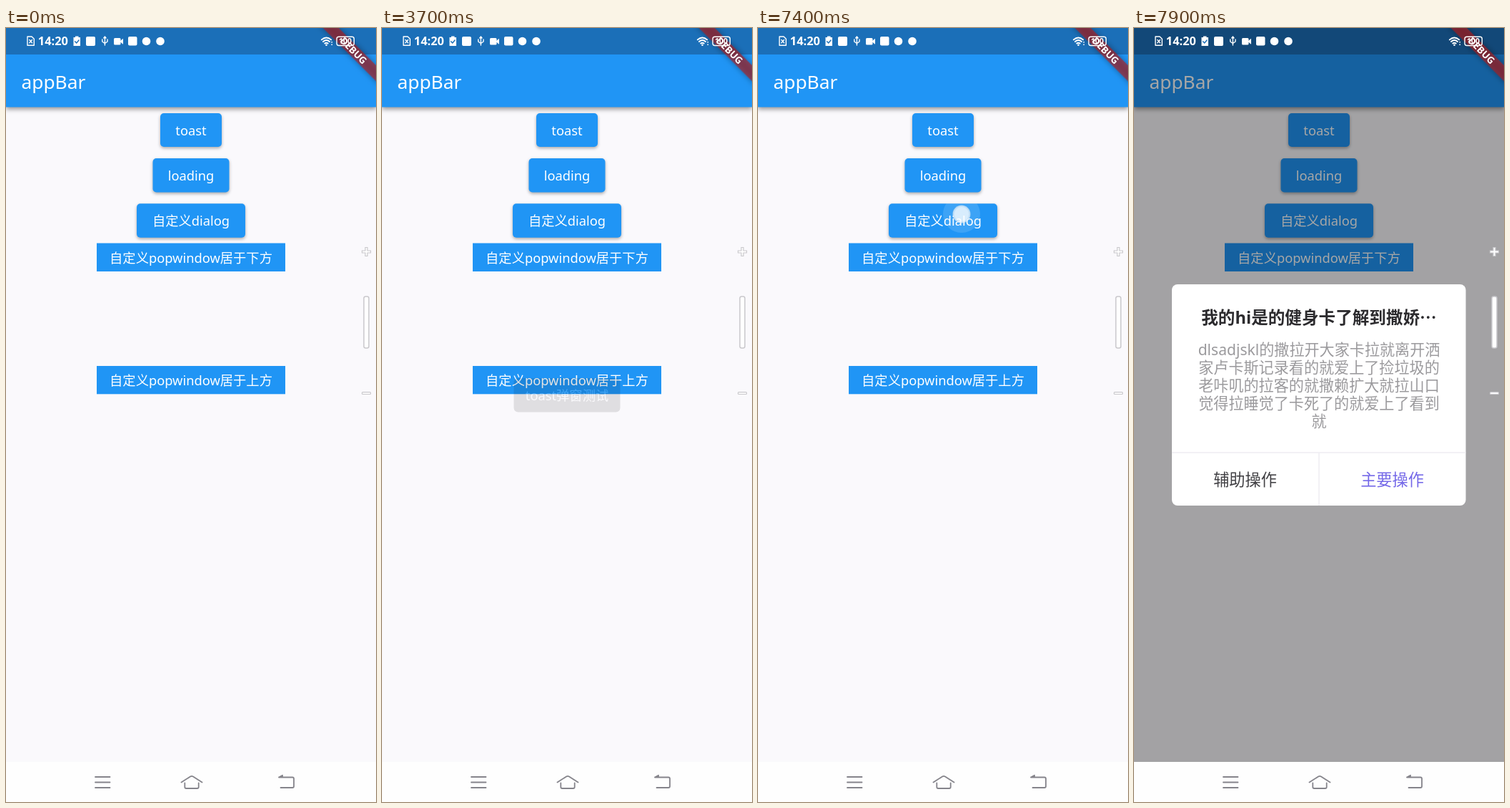
These frames come from a looping animation (518 by 1081 pixels, 8 s). An HTML page:

```html
<!DOCTYPE html>
<html lang="zh-CN">
<head>
<meta charset="utf-8">
<title>appBar</title>
<style>
html, body { margin: 0; width: 100%; height: 100%; overflow: hidden; background: #faf9fc; }
svg { display: block; }
text { font: 18.3px "Noto Sans", "Noto Sans CJK SC", "Noto Sans CJK", sans-serif; fill: #fff; }
.mid { text-anchor: middle; }
.line { fill: none; stroke-linecap: round; stroke-linejoin: round; }
.raised { filter: drop-shadow(0 2px 2px rgba(0,0,0,.32)); }
</style>
</head>
<body>
<svg width="518" height="1081" viewBox="0 0 518 1081">
  <defs>
    <linearGradient id="fade" x1="0" x2="1">
      <stop offset="0" stop-color="#8091ee"/><stop offset="1" stop-color="#5766df"/>
    </linearGradient>
    <radialGradient id="tip">
      <stop offset=".75" stop-color="#fff" stop-opacity=".8"/><stop offset="1" stop-color="#dfe9f2" stop-opacity=".7"/>
    </radialGradient>
  </defs>
  <rect width="518" height="1081" fill="#faf9fc"/>

  <rect width="518" height="110.5" fill="#2095f5" style="filter:drop-shadow(0 3px 3px rgba(0,0,0,.4))"/>
  <rect width="518" height="37" fill="#1b6fb8"/>
  <text x="21.5" y="84.5" style="font-size:26.3px">appBar</text>
  <g id="buttons"></g>

  <g id="toast">
    <rect x="184.5" y="489" width="149" height="47.5" rx="6" fill="#000" fill-opacity=".71"/>
    <text class="mid" x="259" y="520">toast弹窗测试</text>
  </g>
  <g id="spinner"><path class="line" d="M14.8-2.6A15 15 0 0 1-13 7.5" stroke="url(#fade)" stroke-width="2.6"/></g>

  <rect id="dim" width="518" height="1025"/>
  <g id="dialog">
    <rect x="53" y="358" width="411.5" height="309" rx="8" fill="#fff"/>
    <path d="M53 593H464.5M259 593V667" stroke="#eeedf2" stroke-width="1.5"/>
    <text class="mid" x="259" y="413" style="font-size:23.6px;font-weight:700;fill:#2c2b2e">我的hi是的健身卡了解到撒娇<tspan font-family="Noto Sans CJK SC, Noto Sans CJK, sans-serif">⋯</tspan></text>
    <g id="message"></g>
    <text class="mid" x="155.5" y="639" style="font-size:22.2px;fill:#414044">辅助操作</text>
    <text class="mid" x="361.5" y="639" style="font-size:22.2px;fill:#7468e8">主要操作</text>
  </g>

  <g transform="translate(518 0) rotate(45)">
    <rect x="-60" y="36.8" width="120" height="15.7" fill="#b71c1c" fill-opacity=".63" style="filter:drop-shadow(0 0 4px rgba(0,0,0,.55))"/>
    <text class="mid" y="49.4" style="font-size:13.4px;font-weight:800">DEBUG</text>
  </g>

  <!-- status bar -->
  <g class="line" stroke="#fff" stroke-width="1.4">
    <path d="M30 12H36L39.3 15.3V24.3H30ZM32.8 16.5L36.5 20.8M36.5 16.5L32.8 20.8"/>
    <path d="M138.4 13V24M134.8 16V19L138.4 21.5L142 19V16M136.8 14L138.4 12L140 14"/>
    <path d="M441.8 16.4Q448.5 10.4 455.2 16.4M444 19Q448.5 15 453 19M446.3 21.6Q448.5 19.8 450.7 21.6" stroke-width="1.9"/>
    <rect x="463" y="12.3" width="24.3" height="12.2" rx="3"/>
  </g>
  <g fill="#fff">
    <path d="M94.5 13H97V11.6H101.5V13H104V25H94.5Z"/>
    <path d="M96.6 18.8L98.7 21L102 17" class="line" stroke="#1b6fb8" stroke-width="1.4" fill="none"/>
    <rect x="112" y="12" width="13" height="13" rx="2"/>
    <rect x="151" y="14" width="9.5" height="9.5" rx="1.5"/>
    <path d="M160 18L164 14.8V22.7L160 19.5Z"/>
    <rect x="171" y="12" width="12.5" height="12.5" rx="2"/>
    <circle cx="196.5" cy="18.5" r="5.8"/>
    <circle cx="216" cy="18.5" r="5.8"/>
    <circle cx="448.5" cy="23.8" r="1.3"/>
    <path d="M455.4 19H457V20.6H455.4ZM455.4 22.5H457V24.1H455.4Z"/>
  </g>
  <text x="44.8" y="24.4" style="font-size:16.4px;font-weight:600">14:20</text>
  <text class="mid" x="475" y="22.3" style="font-size:10.5px;font-weight:700">100</text>

  <!-- side control -->
  <g fill="#fff" stroke="#c9c8cc" stroke-width="1.2">
    <path d="M503 306.5H506V311H510.5V314H506V318.5H503V314H498.5V311H503Z"/>
    <rect x="501" y="375" width="7" height="72" rx="2.5" stroke-width="1.5"/>
    <rect x="498.5" y="508.7" width="12" height="2.8" rx="1"/>
  </g>

  <!-- navigation bar -->
  <rect y="1025" width="518" height="56" fill="#fefefe"/>
  <g class="line" stroke="#85848b" stroke-width="1.8">
    <path d="M125 1046H145.5M125 1053.5H145.5M125 1061H145.5"/>
    <path d="M245.5 1053.5L258 1045.5Q260 1044.3 262 1045.5L274.5 1053.5M250.3 1054.5V1060Q250.3 1062 252.3 1062H267.7Q269.7 1062 269.7 1060V1054.5"/>
    <path d="M382 1046.5H401Q403 1046.5 403 1048.5V1059Q403 1061 401 1061H384.5M382 1046.5L387 1043.8V1046.5"/>
  </g>
  <circle id="finger" r="12.5" fill="url(#tip)"/>
</svg>
<script>
const $ = id => document.getElementById(id);

// label, x, y, width, height, baseline, raised
const buttons = [
  ['toast', 216, 119, 86, 47, 149.8, 1],
  ['loading', 205.5, 182, 107, 47.5, 213, 1],
  ['自定义dialog', 183, 245.2, 152, 47.5, 276.3, 1],
  ['自定义popwindow居于下方', 127, 300.5, 264, 39.5, 327.5, 0],
  ['自定义popwindow居于上方', 127, 472, 264, 39.3, 499, 0]
];
$('buttons').innerHTML = buttons.map(([label, x, y, w, h, base, raised], i) => {
  const box = `x="${x}" y="${y}" width="${w}" height="${h}" rx="${raised * 5}"`;
  return `<clipPath id="clip${i}"><rect ${box}/></clipPath>
    <rect ${box} fill="#2095f5" class="${raised ? 'raised' : ''}"/>
    <g clip-path="url(#clip${i})"><circle id="ripple${i}" fill="#fff" r="0"/></g>
    <text class="mid" x="259" y="${base}">${label}</text>`;
}).join('');

$('message').innerHTML = [
  'dlsadjskl的撒拉开大家卡拉就离开洒',
  '家卢卡斯记录看的就爱上了捡垃圾的',
  '老咔叽的拉客的就撒赖扩大就拉山口',
  '觉得拉睡觉了卡死了的就爱上了看到',
  '就'
].map((s, i) => `<text class="mid" x="259" y="${456.5 + 25 * i}" style="font-size:21.1px;fill:#9b9a9d">${s}</text>`).join('');

// touch start, main time, x, y, ripple strength at the main time
const taps = [
  [1500, 1500, 263, 145, .25],
  [4300, 4400, 262, 207, .24],
  [7400, 7400, 285, 260, .13]
];

function set(id, attrs) {
  for (const k in attrs) $(id).setAttribute(k, attrs[k]);
}

// Linear interpolation through [time, value] points, held at both ends.
function track(t, ...points) {
  if (t <= points[0][0]) return points[0][1];
  for (let i = 1; i < points.length; i++) {
    const [a, u] = points[i - 1], [b, v] = points[i];
    if (t < b) return u + (v - u) * (t - a) / (b - a);
  }
  return points[points.length - 1][1];
}

function draw(t) {
  set('finger', { opacity: 0 });
  taps.forEach(([start, main, x, y, strength], i) => {
    const d = t - main;
    const alpha = t < start ? 0 : track(d, [-100, .1], [0, strength], [100, .22], [200, .17], [300, .1], [400, .03], [500, 0]);
    set('ripple' + i, { cx: x, cy: y, r: Math.max(12, 26 + d * .6), opacity: alpha });
    if (t >= start && d < 100) set('finger', { cx: x, cy: y, opacity: 1 });
  });

  set('toast', {
    opacity: track(t, [1400, 0], [1500, .16], [1600, .55], [1700, .88], [1800, 1],
      [3400, 1], [3500, .78], [3600, .45], [3700, .15], [3800, 0])
  });
  set('spinner', {
    opacity: track(t, [4400, 0], [4500, .6], [4600, 1], [6500, 1], [6600, .5], [6700, 0]),
    transform: `translate(260 513.5) rotate(${(t - 4600) * .36})`
  });

  const open = track(t, [7400, 0], [7500, .22], [7600, .56], [7700, .79], [7800, .93], [7900, 1]);
  set('dim', { opacity: .35 * open });
  set('dialog', {
    opacity: Math.min(1, open * 2),
    transform: `translate(259 512.5) scale(${open}) translate(-259 -512.5)`
  });
}

const begin = performance.now();
function tick() {
  const t = (performance.now() - begin) % 8000;
  draw(Math.floor(t / 100) * 100);
  requestAnimationFrame(tick);
}
tick();
</script>
</body>
</html>
```
